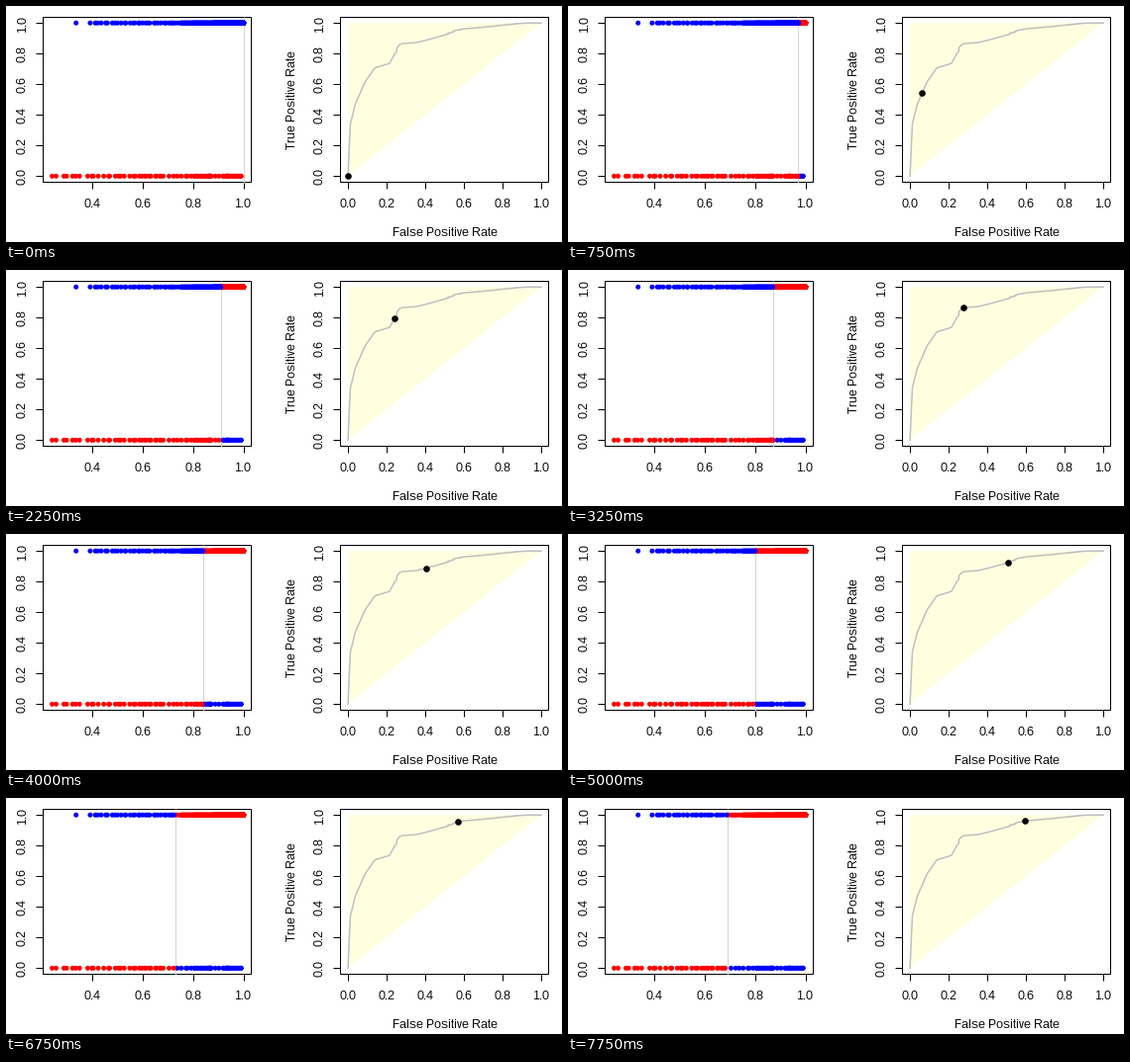
A matplotlib script that plays this animation: 561x239 px, repeating every 8 s.

```python
import numpy as np
import matplotlib.pyplot as plt
from matplotlib.animation import FuncAnimation

W, H, DPI = 561, 239, 72          # at 72 dpi one point is one pixel
STEPS, INTERVAL = 32, 250
TOP, BOTTOM = 11, 178
FIFTHS = np.arange(6) / 5

plt.rcParams.update({
    "font.family": "Liberation Sans",
    "font.size": 12,
    "text.hinting": "default",
    "text.hinting_factor": 1,
})

fig = plt.figure(figsize=((W + 0.01) / DPI, (H + 0.01) / DPI), dpi=DPI, facecolor="white")
ax = fig.add_axes([0, 0, 1, 1])
ax.set(xlim=(0, W), ylim=(H, 0))
ax.axis("off")


def score_x(score):
    return 239.8 - 254 * (1 - score)


def step_x(step):
    """Place of the score reached after lowering the threshold by 0.01 per step."""
    return score_x(1 - 0.01 * step)


def rate_x(rate):
    return 345 + 195 * rate


def rate_y(rate):
    return 172.3 - 155.1 * rate


def line(xs, ys, color="black", width=1, z=2, **kw):
    return ax.plot(xs, ys, color=color, lw=width, zorder=z, **kw)[0]


def label(x, y, text, angle=0):
    ax.text(x, y, text, rotation=angle, ha="center", va="baseline",
            rotation_mode="anchor", zorder=3)


def panel(left, right, ticks, to_x):
    line([left, right, right, left, left], [TOP, TOP, BOTTOM, BOTTOM, TOP],
         solid_joinstyle="miter")
    for t in ticks:
        x = to_x(t)
        line([x, x], [BOTTOM, BOTTOM + 7], solid_capstyle="butt")
        label(x, 204, f"{t:.1f}")
    for t in FIFTHS:
        y = rate_y(t)
        line([left - 7, left], [y, y], solid_capstyle="butt")
        label(left - 17.5, y, f"{t:.1f}", 90)


def dots(xs, y, radius, color="black"):
    return ax.scatter(xs, np.full(len(xs), y), s=(2 * radius) ** 2, c=color,
                      linewidths=0, zorder=5)


# Key points (step, share of the class above the threshold)
N_NEG, N_POS = 79, 700
neg_keys = np.array([(0, 0), (1, 1), (6, 11), (7, 17), (9, 19), (13, 22), (14, 28),
                     (20, 40), (24, 43), (31, 47), (43, 59), (58, 69), (77, N_NEG)])
pos_keys = np.array([(0, 0), (1, .34), (2, .47), (4, .615), (6, .707), (9, .795),
                     (12, .857), (16, .888), (20, .923), (25, .951), (31, .961),
                     (43, .978), (51, .988), (60, .997), (67, 1)])

# Scores are jittered quantiles of those two distributions
rng = np.random.default_rng(4)


def sample(n, keys, total):
    share = (np.arange(n) + rng.random(n)) / n * total
    return np.interp(share, keys[:, 1], keys[:, 0])


neg = sample(N_NEG, neg_keys, N_NEG)
pos = sample(N_POS, pos_keys, 1)

steps = np.arange(neg_keys[-1, 0] + 1)
roc_x = rate_x((neg < steps[:, None]).mean(axis=1))
roc_y = rate_y(np.interp(steps, *pos_keys.T))

panel(37, 247, FIFTHS[2:], score_x)
panel(337, 547, FIFTHS, rate_x)
label(rate_x(0.5), 233, "False Positive Rate")
label(292, rate_y(0.5), "True Positive Rate", 90)

triangle = np.array([(0, 0), (0, 1), (1, 1)])
ax.fill(rate_x(triangle[:, 0]), rate_y(triangle[:, 1]), color="lightyellow", lw=0, zorder=1)
line(roc_x, roc_y, "#bebebe", 1.5, 4)

cut = line([0, 0], [TOP, BOTTOM + 1], "lightgray", 1, 4, solid_capstyle="butt")
pos_dots = dots(step_x(pos), rate_y(1), 2.5)
neg_dots = dots(step_x(neg), rate_y(0), 2.5)
marker = dots(roc_x[:1], roc_y[0], 3.3)


def draw(k):
    pos_dots.set_facecolor(np.where(pos < k, "red", "blue"))
    neg_dots.set_facecolor(np.where(neg < k, "blue", "red"))
    cut.set_xdata([step_x(k)] * 2)
    marker.set_offsets([[roc_x[k], roc_y[k]]])
    return pos_dots, neg_dots, marker, cut


anim = FuncAnimation(fig, draw, frames=STEPS, interval=INTERVAL, repeat=True,
                     repeat_delay=0, blit=False)
plt.show()
```
